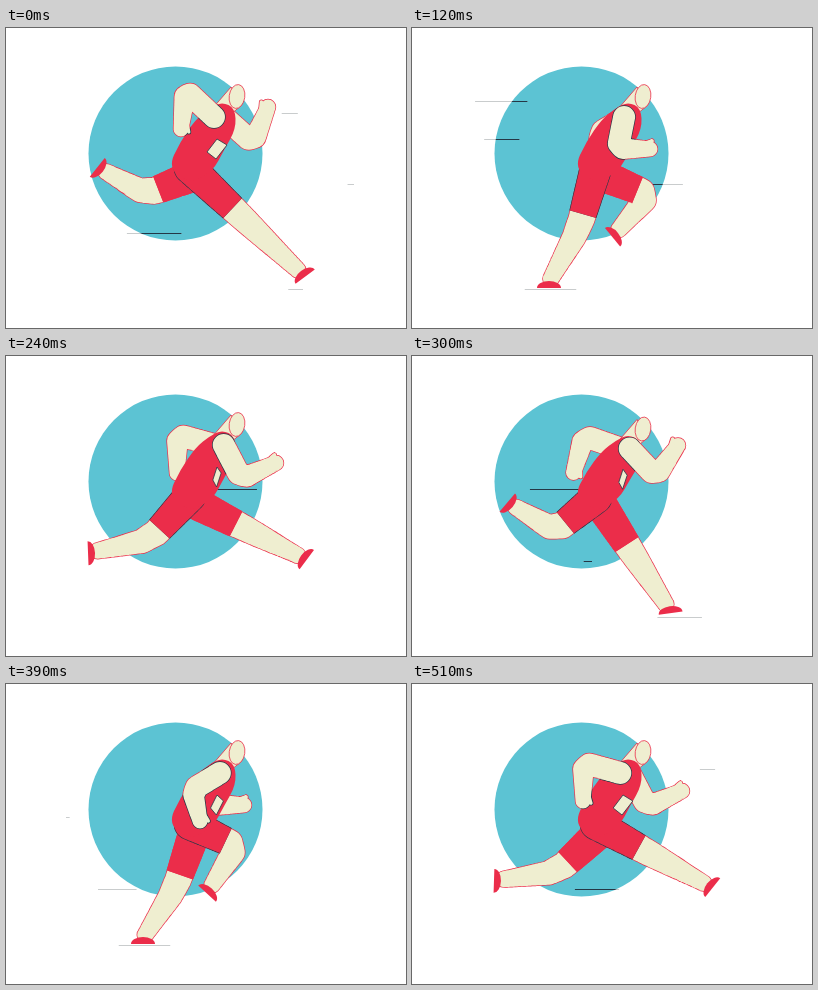
Recreate the animation shown at these times as an HTML page with a canvas. Size 400x300 px, loop 0.54 s.

```html
<!DOCTYPE html>
<html lang="en">
<head>
<meta charset="utf-8">
<title>Runner</title>
<style>
  html, body { margin: 0; width: 100%; height: 100%; overflow: hidden; background: #fff; }
  canvas { display: block; width: 100vw; height: 100vh; }
</style>
</head>
<body>
<canvas id="stage" width="400" height="300"></canvas>
<script>
const ctx = document.getElementById('stage').getContext('2d');
const LOOP = 540, HALF = LOOP / 2, STEP = 30, GROUND = 256;
const RED = '#eb2d4a', CREAM = '#efeed0', BLUE = '#5cc3d3', INK = '#243746', PALE = '#c9cccd';

// Closed paths through [time, x, y]; the far limbs run half a loop later
const ANKLE_PATH = [
  [0, 296, 246], [60, 200, GROUND], [120, 136, GROUND], [240, 86, 196],
  [270, 95, 141], [330, 104, 163], [390, 203, 206], [510, 297, 202]
];
const HAND_PATH = [
  [0, 175, 101], [60, 148, 132], [120, 238, 121], [240, 270, 107],
  [270, 262, 79], [330, 270, 107], [390, 194, 137], [510, 171, 117]
];

// Speed lines: height, start time, from x, to x
const LINES = [
  [73, -26, 238, 45], [111, -26, 190, 60], [156, -25, 348, 225],
  [133, 185, 255, 60], [205, 440, 220, 50], [205, 271, 180, 60],
  [261, -30, 297, 98], [261, 240, 297, 98], [85, 422, 312, 262]
];
const LINE_TIME = 180, LINE_LAG = 0.22;

const mod = (n, m) => ((n % m) + m) % m;
const clamp = u => Math.max(0, Math.min(1, u));
const smoothstep = u => u * u * (3 - 2 * u);
const mix = (a, b, u) => a + (b - a) * u;
const mixPoint = (p, q, u) => [mix(p[0], q[0], u), mix(p[1], q[1], u)];
const reach = ([x, y], angle, length) => [x + Math.cos(angle) * length, y + Math.sin(angle) * length];
const distance = (p, q) => Math.hypot(q[0] - p[0], q[1] - p[1]);
const heading = (p, q) => Math.atan2(q[1] - p[1], q[0] - p[0]);
const swing = time => Math.cos(2 * Math.PI * time / LOOP);

// The body dips during the first part of each step
function bob(time) {
  const u = mod(time, HALF) / 120;
  return u < 1 ? 9 * Math.sin(Math.PI * u) ** 2 : 0;
}

// Periodic Hermite curve that never overshoots its keys
function along(keys, time) {
  const n = keys.length, t = mod(time, LOOP);
  const at = (i, c) => keys[mod(i, n)][c] + (c ? 0 : Math.floor(i / n) * LOOP);
  let i = n - 1;
  while (at(i, 0) > t) i--;
  const span = at(i + 1, 0) - at(i, 0), u = (t - at(i, 0)) / span;
  const slope = (j, c) => (at(j + 1, c) - at(j, c)) / (at(j + 1, 0) - at(j, 0));
  const tangent = (j, c) => {
    const a = slope(j - 1, c), b = slope(j, c);
    return a * b > 0 ? 2 * a * b / (a + b) : 0;
  };
  return [1, 2].map(c => mix(at(i, c), at(i + 1, c), smoothstep(u)) +
    span * (tangent(i, c) * u * (1 - u) ** 2 - tangent(i + 1, c) * u * u * (1 - u)));
}

// Middle joint: pushed sideways from the line between root and end
const bendJoint = (root, end, bend) =>
  reach(mixPoint(root, end, 0.5), heading(root, end) - Math.PI / 2, bend);
const bendFor = (bone, span) => Math.sqrt(Math.max(0, bone ** 2 - span ** 2 / 4));

// Tapered limb as a sweep of discs; grow widens it for the outline
function sweep([a, b, c], radii, grow = 0, last = 2) {
  const path = new Path2D();
  const point = u => u < 1 ? mixPoint(a, b, u) : mixPoint(b, c, u - 1);
  for (let u = 0; u <= last; u += 1 / 32) {
    const d = Math.min(0.16, u, 2 - u);
    const [x, y] = mixPoint(point(u - d), point(u + d), 0.5);
    const r = u < 1 ? mix(radii[0], radii[1], u) : mix(radii[1], radii[2], u - 1);
    path.moveTo(x + r + grow, y);
    path.arc(x, y, r + grow, 0, 7);
  }
  return path;
}

function fill(path, color) {
  ctx.fillStyle = color;
  ctx.fill(path);
}

function outlined(path, color, edge = RED) {
  fill(path, color);
  ctx.strokeStyle = edge;
  ctx.lineWidth = 0.8;
  ctx.stroke(path);
}

function clipped(path, paint) {
  ctx.save();
  ctx.clip(path);
  paint();
  ctx.restore();
}

function polygon(points) {
  const path = new Path2D();
  points.forEach(p => path.lineTo(...p));
  path.closePath();
  return path;
}

function smooth(points) {
  const path = new Path2D(), n = points.length;
  path.moveTo(...mixPoint(points[n - 1], points[0], 0.5));
  points.forEach((p, i) => path.quadraticCurveTo(...p, ...mixPoint(p, points[(i + 1) % n], 0.5)));
  path.closePath();
  return path;
}

function drawLeg(time, hip, shortsEdge) {
  const ankle = along(ANKLE_PATH, time), span = distance(hip, ankle);
  const bend = Math.max(bendFor(52, span), 5 - 13 * swing(time + 30));
  const knee = bendJoint(hip, ankle, bend), shin = heading(knee, ankle);
  const joints = [hip, knee, reach(ankle, shin, -6)], radii = [15.5, 12.5, 8];
  fill(sweep(joints, radii, 0.7), RED);
  fill(sweep(joints, radii), CREAM);

  const planted = clamp((ankle[1] - GROUND + 8) / 8);
  ctx.save();
  ctx.translate(...ankle);
  ctx.rotate(mix(shin - 1.4, 0, planted));
  ctx.beginPath();
  ctx.ellipse(1, 4, 12, 7, 0, Math.PI, 2 * Math.PI);
  ctx.fillStyle = RED;
  ctx.fill();
  ctx.restore();

  const thigh = heading(hip, knee), hem = reach(hip, thigh, 0.76 * distance(hip, knee));
  const back = reach(hip, thigh, -20), across = thigh + Math.PI / 2;
  const shorts = polygon([reach(back, across, 24), reach(hem, across, 24), reach(hem, across, -24), reach(back, across, -24)]);
  clipped(shorts, () => {
    fill(sweep(joints, radii, 0.8, 1), shortsEdge);
    fill(sweep(joints, radii, 0.2, 1), RED);
  });
}

function drawArm(time, torso) {
  const shoulder = [213 - 5 * swing(time), 89 + 0.8 * bob(time)];
  const hand = along(HAND_PATH, time), span = distance(shoulder, hand);
  const bone = Math.max(35.5 + 3.5 * swing(2 * time), span * 0.52);
  const elbow = bendJoint(shoulder, hand, -bendFor(bone, span));
  const forearm = heading(elbow, hand), side = forearm - Math.PI / 2;
  const thumb = [[-8, 3], [-2, 6], [2, 8]].map(([x, y]) => reach(reach(hand, forearm, x), side, y));
  const paint = (grow, color) => {
    fill(sweep([shoulder, elbow, hand], [11, 11, 7.5], grow), color);
    fill(sweep(thumb, [3, 2.5, 1.8], grow), color);
  };
  paint(0.7, RED);
  if (torso) clipped(torso, () => paint(0.7, INK));
  paint(0, CREAM);
}

const disc = new Path2D();
disc.arc(169.5, 125.5, 87, 0, 7);

// Both ends ease along the same track, the right one later
function drawLines(time) {
  for (const [y, start, from, to] of LINES) {
    const u = mod(time - start, LOOP) / LINE_TIME;
    const end = v => mix(from, to, smoothstep(clamp(v)));
    const left = end(u), width = end(u - LINE_LAG) - left;
    const paint = color => {
      ctx.fillStyle = color;
      ctx.fillRect(left, y, width, 1);
    };
    paint(PALE);
    clipped(disc, () => paint(INK));
  }
}

function drawBib(time, dip) {
  const width = 0.7 + 0.3 * swing(time);
  const corners = [[-10, 3], [0, -10], [10, -4], [-1, 10]];
  outlined(polygon(corners.map(([x, y]) => [211 + x * width, 121 + dip / 2 + y])), CREAM, INK);
}

function draw(time) {
  const dip = bob(time);
  const torso = smooth([
    [204, 80], [216, 74], [229, 80], [230, 101], [218, 122],
    [207, 143], [184, 156], [162, 140], [174, 114], [190, 91]
  ].map(([x, y]) => [x, y + dip * clamp((142 - y) / 60)]));

  ctx.fillStyle = '#fff';
  ctx.fillRect(0, 0, 400, 300);
  fill(disc, BLUE);
  drawLines(time);

  drawArm(time + HALF);
  drawLeg(time + HALF, [189, 147 + dip * 0.4], RED);
  drawLeg(time, [184, 140 + dip * 0.4], INK);

  outlined(polygon([[206, 81], [225, 59], [236, 77], [225, 86]].map(([x, y]) => [x, y + dip])), CREAM);
  fill(torso, RED);
  drawBib(time, dip);

  const head = new Path2D();
  head.ellipse(231, 68.5 + dip, 7.8, 12, 0.14, 0, 7);
  outlined(head, CREAM);

  drawArm(time, torso);
}

const start = performance.now();
function tick() {
  const elapsed = (performance.now() - start) % LOOP;
  draw(Math.floor(elapsed / STEP) * STEP);
  requestAnimationFrame(tick);
}
tick();
</script>
</body>
</html>
```
